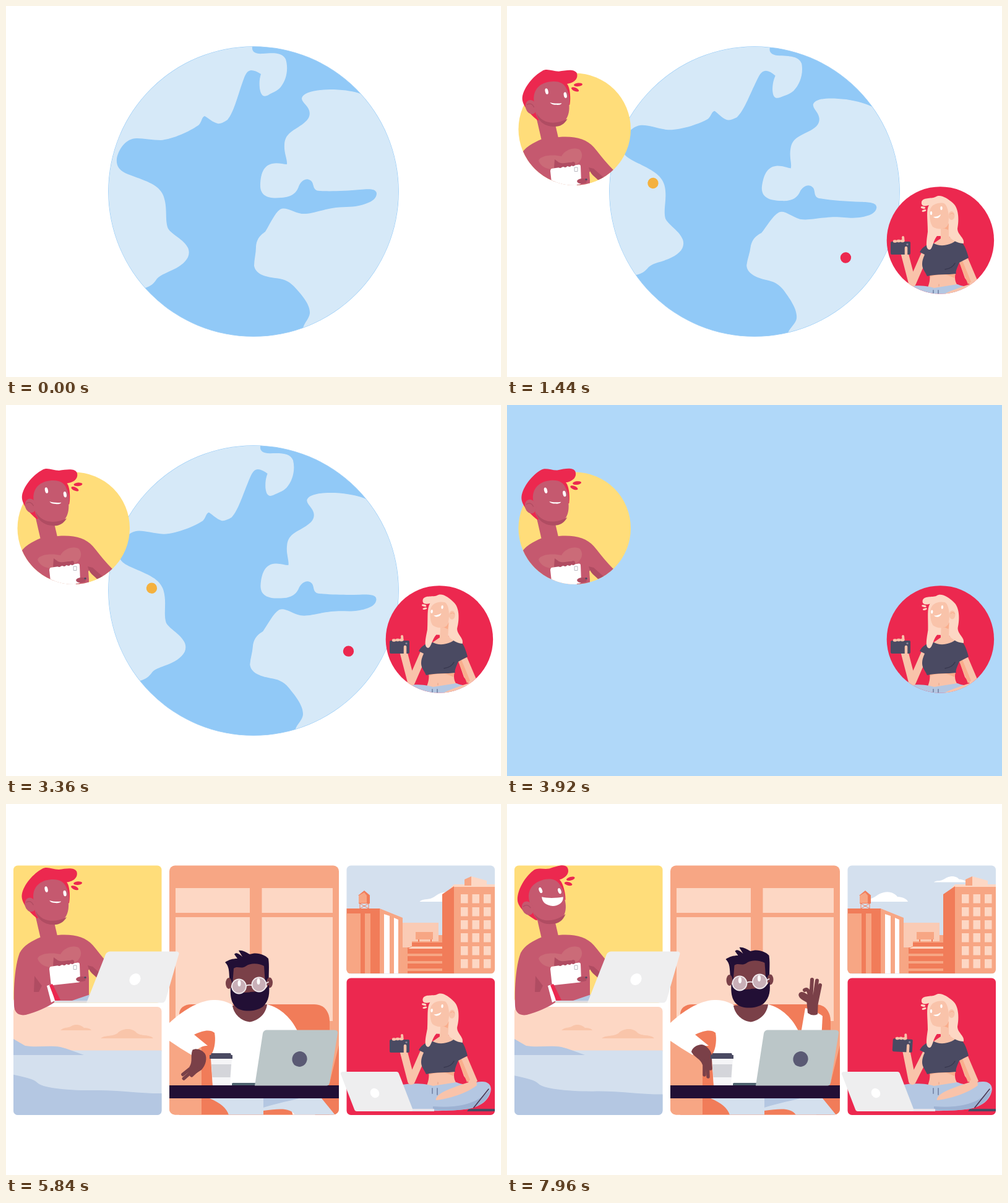
Write an HTML page that moves like this. It is 800 px wide and 600 px high and loops after 8000 ms.

```html
<!DOCTYPE html>
<html lang="en">
<head>
<meta charset="utf-8">
<title>Connected world</title>
<style>
html, body { margin: 0; width: 100%; height: 100%; overflow: hidden; background: #fff; }
svg { display: block; width: 100%; height: 100%; }
.sea { fill: #91c9f7 } .land { fill: #d6e9f8 }
.red { fill: #ec284f } .yellow { fill: #ffdd7a } .white { fill: #fff }
.rose { fill: #c5596f } .roseLight { fill: #cb6b78 } .roseDark { fill: #b04c62 }
.peach { fill: #fdd7c4 } .orange { fill: #f7a684 } .rust { fill: #f17c59 }
.ice { fill: #d4e0ee } .denim { fill: #b4c7e2 }
.ink { fill: #220f35 } .brown { fill: #7a4048 } .slate { fill: #4a4a62 }
.skin { fill: #f9c3aa } .paper { fill: #eeeeef }
.line { fill: none; stroke-linecap: round; stroke-linejoin: round }
</style>
</head>
<body>
<svg viewBox="0 0 800 600" xmlns="http://www.w3.org/2000/svg">
<defs>
  <clipPath id="globeClip"><circle cx="400" cy="300" r="234.3"/></clipPath>
  <clipPath id="manClip"><rect id="manMask"/></clipPath>
  <clipPath id="womanClip"><rect id="womanMask"/></clipPath>
  <clipPath id="cafeClip"><rect x="264" y="99.500" width="274" height="403" rx="9"/></clipPath>
  <clipPath id="cityClip"><rect x="550.500" y="99.500" width="239.500" height="175" rx="7"/></clipPath>
  <clipPath id="beachClip"><rect x="12" y="328" width="239.500" height="175" rx="7"/></clipPath>
  <path id="cloud" d="M0 16C4 11 14 13 20 10C26 8 28 3 38 1C48-2 58 4 60 8C68 8 76 12 77 16Z"/>
  <g id="coin"><circle r="14.500"/><circle class="line" r="11" stroke="#e08a28" stroke-width="1.500" opacity=".55"/></g>
</defs>

<g id="globe">
  <circle class="sea" cx="400" cy="300" r="234.800"/>
  <g clip-path="url(#globeClip)">
    <circle class="land" cx="400" cy="300" r="234.500"/>
    <g id="spin">
      <path class="sea" d="M398 50V66C397 74 403 78 415 77C436 75 447 76 452 86C457 102 453 120 444 131C438 138 430 140 424 144C416 148 412 145 410 133C409 122 410 117 412 110C406 106 401 104 396 104C388 105 386 113 381 127C374 147 368 172 358 184C352 188 346 191 342 190C334 188 328 182 321 178C316 180 317 186 312 192C300 201 272 215 250 217C232 217 215 212 204 215C190 219 181 235 179 247C178 258 182 266 197 272C222 282 246 287 254 306C262 326 256 345 262 360C268 370 287 377 294 391C300 405 289 416 275 424C262 431 250 434 244 441C239 449 234 453 225 456L150 540L300 600L460 570L480 521C482 512 490 506 491 497C492 482 476 465 465 453C456 444 447 441 435 440C418 438 403 433 401 420C401 410 404 400 404 390C405 374 414 369 419 365C426 354 434 335 443 329C452 324 462 333 478 336C492 337 505 331 527 327C545 324 556 326 570 323C588 319 599 313 599 303C598 295 586 296 572 297C550 299 524 300 507 299C494 299 499 286 492 282C484 277 476 284 473 292C470 301 463 309 445 310C425 312 412 308 411 292C411 272 416 258 430 255C440 253 447 256 454 256C455 248 449 238 450 224C451 207 462 203 475 194C487 186 493 179 490 169C487 160 478 156 478 149C481 139 500 135 530 135C550 136 562 138 573 142L640 100L560 40Z"/>
      <circle id="dotA" cx="235.500" cy="305.400" fill="#f4b13f"/>
      <circle id="dotB" class="red" cx="558.700" cy="389.400"/>
    </g>
  </g>
</g>

<g id="panels">
  <g clip-path="url(#beachClip)">
    <rect class="peach" x="12" y="328" width="240" height="72"/>
    <path fill="#f9c5aa" d="M88 366C94 360 100 363 106 359C114 355 122 358 126 362C132 362 136 363 138 366ZM153 379C160 373 170 377 180 371C188 362 204 362 211 370C218 376 232 372 238 379Z"/>
    <rect class="ice" x="12" y="398.500" width="240" height="105"/>
    <path class="denim" d="M12 380L31 391C50 394 68 390 88 393C100 396 112 401 126 406H12Z"/>
    <path id="wave" class="denim" d="M0 425C25 431 45 434 51 441C58 449 100 454 150 453C185 453 220 459 260 458V520H0Z"/>
  </g>

  <g clip-path="url(#cityClip)">
    <rect class="ice" x="550" y="99" width="241" height="176"/>
    <use id="cloudA" class="white" href="#cloud"/>
    <use id="cloudB" class="white" href="#cloud"/>
    <path class="line" d="M572 161V169M586 161V169M572 161L586 169M586 161L572 169" stroke="#f17c59"/>
    <path class="rust" d="M570 148H588V161H570ZM569 148L579 140L588.500 148Z"/>
    <path class="orange" d="M570 148L579 143L583 148V160H570Z"/>
    <path class="rust" d="M550 169H604V274H550Z"/>
    <path class="orange" d="M550 177H573V274H550ZM580 177H589V274H580Z"/>
    <path class="orange" d="M604 169L641 184V274H604Z"/>
    <path class="white" d="M611 178L620 181V274H611ZM627 184L634 187V274H627Z"/>
    <path fill="#facbb5" d="M641 192H699V274H641Z"/>
    <path class="orange" d="M662 207H690V219H662ZM699 212H705V274H699ZM656 222H705V232H656ZM641 232H650V274H641Z"/>
    <path class="rust" d="M666 219H668V223H666ZM686 219H688V223H686ZM656 224H705V232H656ZM649 232H705V274H649Z"/>
    <path class="line" d="M655 232H705M649 244H705M649 256H705M649 268H705" stroke="#f7a684" stroke-width="4"/>
    <path class="peach" d="M656 231H705V234H650ZM724 130H790V136H718ZM752 117L777 124V132H752Z"/>
    <path class="orange" d="M741 122L752 117V132H741ZM724 134H790V274H724Z"/>
    <path class="rust" d="M705 146L724 133V274H705Z"/>
    <g id="windows" class="peach"></g>
  </g>

  <g clip-path="url(#cafeClip)">
    <rect class="orange" x="264" y="99" width="274" height="404"/>
    <path class="peach" d="M274 136H394V176H274ZM413.500 136H528V176H413.500ZM274 183H394V351H274ZM413.500 183H528V351H413.500Z"/>
    <path class="rust" d="M280 503V340C280 330 288 324 300 324H498C513 324 522 334 523 350V503Z"/>
    <path class="orange" d="M264 376H302C312 380 316 390 316 400V503H264Z"/>
    <path class="rust" d="M500 476H538V503H500ZM538 390V455H522Z"/>
    <g id="okHand">
      <path class="white" d="M470 400L482 330C492 332 504 338 510 343L507 400Z"/>
      <path class="brown" d="M486 338L484 316Q492 306 503 316L502 340Q494 344 486 338Z"/>
      <path class="line" stroke="#7a4048" stroke-width="6" d="M491 318L493 284M496 320L501 285.500M500 322L506 293M488 319C474 313 472 308 476 307C480 306 484 312 487 312M489 314C489 302 485 298 481 301"/>
    </g>
    <path class="white" d="M264 354C285 335 310 318 335 317C350 316 362 322 372 328L422 324C445 330 462 348 471 367V455H334L332 405C338 395 339 380 337 370C330 364 318 366 304 373L326 391C318 390 308 396 300 406C288 399 276 391 264 383Z"/>
    <path class="brown" d="M366 326L422 324C420 340 408 350 394 352.500C380 351 368 340 366 326Z"/>
    <g id="tapHand" class="brown">
      <path d="M298 401C299 394 307 389 315 389C323 390 331 400 332 410L331 420L316 422C313 412 303 410 298 401Z"/>
      <path class="line" stroke="#7a4048" stroke-width="5.500" d="M319 416L319 438M324 416L325 441M328 412L329 428"/>
    </g>
    <g id="cafeHead">
      <path class="ink" d="M362 293C360 272 362 264 354 256C360 252 366 250 374 250L369 243C372 239 377 242 382 247L376 237C382 236 388 240 394 243C405 239 418 243 424 250C426 262 424 275 425 293Z"/>
      <ellipse class="brown" cx="360" cy="290" rx="5" ry="9"/><ellipse class="brown" cx="426" cy="289" rx="5" ry="8.500"/>
      <path class="brown" d="M368 266C374 261 380 268 388 262C396 256 410 258 417 262L420 306H365Z"/>
      <path class="ink" d="M363 296C362 312 364 328 380 333C390 336 405 335 415 328C426 318 426 305 425 292L420 298C412 304 405 303 395 304C385 306 372 306 363 296Z"/>
      <path class="brown" d="M386 294H399C399 308 387 308 386 294Z"/>
      <g fill="#c9b0b8" stroke="#f0e9ec" stroke-width="1.800"><circle cx="376.500" cy="295" r="11.500"/><circle cx="409" cy="292" r="11.500"/><path class="line" d="M388 294Q392 292 397.500 293M420 290L424 288"/></g>
      <ellipse class="white" cx="377" cy="290" rx="2.500" ry="5"/><ellipse class="white" cx="408" cy="287" rx="2.500" ry="5"/>
    </g>
    <path fill="#f5f5f7" d="M331 412H365L362 455H334Z"/>
    <path fill="#d4d5da" d="M332 421H364L362.500 442H333.500Z"/>
    <path class="slate" d="M332 403H363L364 406H366V412H329V406H331Z"/>
    <rect x="365" y="451" width="42" height="5" rx="2" fill="#4f6470"/>
  </g>
  <rect class="ink" x="264" y="455" width="274" height="21"/>
  <path fill="#bbc6c8" d="M421 365.500H531Q537 366 536 371L523 451Q522 455.500 518 455.500H402L415 371Q416 366 421 365.500Z"/>
  <ellipse cx="474.500" cy="412.500" rx="12" ry="12.500" fill="#5a5a74" transform="rotate(25 474.500 412.500)"/>
  <g clip-path="url(#cafeClip)">
    <path class="ice" d="M329 476H416V503H360C357 492 346 483 329 476ZM416 476H510L532 503H467C460 492 445 492 416 496Z"/>
    <path class="denim" d="M416 476H474C450 482 430 486 416 491Z"/>
  </g>
</g>

<g id="man">
  <rect id="manBack" class="yellow"/>
  <g id="manCoins" fill="#f4b143"></g>
  <g clip-path="url(#manClip)">
    <path class="rose" d="M57 215C42 221 28 229 22 241C14 262 12 300 13 325C13 337 20 343 32 341C48 337 66 329 78 321H134V262L140 265L158 280L174 267C162 256 150 240 140 228C128 215 110 210 84 212Z"/>
    <path class="yellow" d="M133 268L148 283L139 291L134 282Z"/>
    <path class="roseDark" d="M132 261L140 263L158 279L150 284C142 276 134 272 132 261ZM46 278L58 294L53 304L45 304Z"/>
    <path class="roseLight" d="M51 250C54 241 75 240 88 243C94 232 108 228 117 232C124 238 122 250 112 256C90 266 58 270 51 250Z"/>
    <path class="roseDark" d="M76 262L77 248L84 253C92 257 104 250 110 255L112 261Z"/>
    <path class="white" d="M72 263L116 256.500Q119 256 119 259L120 285Q120 288 117 288.500L76 293Q73 293 72.500 290L70 267Q70 264 72 263Z"/>
    <rect id="cardFill" class="white" x="71" y="284" width="42" height="14"/>
    <path class="line" stroke="#b04c62" stroke-width="6" d="M86 257V259M94 257V258M101 256V257M107 255V256"/>
    <rect class="line" x="109.500" y="261" width="4.500" height="6.500" stroke="#b9b9c0"/>
    <path class="roseDark" d="M113 283C115 279 122 278 130 280L128 286C120 288 114 288 113 283Z"/>
    <circle class="slate" cx="128" cy="280.500" r="1.600"/>
    <g class="manExtra">
      <path class="white" d="M66 294L72 292L79 318L73 321Z"/>
      <path class="red" d="M70 293L75 291L88 317L80 319Z"/>
      <path class="denim" d="M98 321L136 308V321Z"/>
      <path fill="#dcdce2" d="M78 318H134V321.500H78Z"/>
    </g>
  </g>
  <path class="rose" d="M45 170L57 222H85L76 183Z"/>
  <g id="manHead">
    <path class="red" d="M50 185C38 175 24 160 25.500 147C28 130 45 112 58 105C66 100 75 106 85 106C98 104 110 102 114 109C117 118 110 125 98 126.500C103 132 104 150 102 160Z"/>
    <path class="rose" d="M44 152C43 130 60 122 76 122C88 122 94 127 97 134C101 142 103 150 101 160C102 178 95 192 76 195C62 196 50 185 47 174Z"/>
    <path class="roseDark" d="M48 173C58 192 80 192 98 183C92 193 84 196 75 195C62 195 50 186 48 173Z"/>
    <ellipse class="rose" cx="39.500" cy="163" rx="9" ry="11.500" transform="rotate(-15 39.500 163)"/>
    <path class="line" stroke="#b04c62" stroke-width="1.300" d="M33 159Q40 155 44 163"/>
    <ellipse class="red" cx="116" cy="128" rx="7" ry="2.800" transform="rotate(-5 116 128)"/>
    <ellipse class="red" cx="111" cy="135.500" rx="6.500" ry="2.800" transform="rotate(24 111 135.500)"/>
    <ellipse class="white" cx="65" cy="138" rx="2.500" ry="4.800" transform="rotate(-12 65 138)"/>
    <ellipse class="white" cx="95" cy="144.500" rx="2.500" ry="4.800" transform="rotate(-10 95 144.500)"/>
    <path id="smile" class="white"/>
  </g>
  <g class="manExtra">
    <path class="paper" d="M168 238.500H275Q281 239 279 244L258 317Q256 321.500 252 321.500H130L161 243Q163 239 168 238.500Z"/>
    <ellipse class="white" cx="208.500" cy="283.500" rx="8.500" ry="10" transform="rotate(40 208.500 283.500)"/>
  </g>
</g>

<g id="woman">
  <rect id="womanBack" class="red"/>
  <g id="womanCoins"></g>
  <g clip-path="url(#womanClip)">
    <path class="skin" d="M731 414L745 408L762 448L752 456L740 440Z"/>
    <path fill="#f9ad8c" d="M731 414L736 412L750 446L745 450Z"/>
    <path class="skin" d="M683 432L725 430C722 444 726 450 732 456L676 462C684 450 684 440 683 432Z"/>
    <path fill="#f9ad8c" d="M683 432H725L723 440C710 432 695 434 684 438Z"/>
    <path class="denim" d="M632 456C650 450 680 452 690 456L728 450C745 458 757 448 770 449C780 449 786 456 783 466C778 484 760 492 740 494C715 497 690 496 650 496Z"/>
    <path fill="#9db2d3" d="M690 489C730 492 760 486 783 462C778 484 760 492 740 494C722 496 705 496 690 494Z"/>
    <path class="skin" d="M760 446C742 452 722 458 706 466C698 471 694 475 695 479C708 478 742 470 761 455Z"/>
    <path class="line" stroke="#7f8fb0" stroke-width="2" d="M689 460V468M697 460V470"/>
    <path class="line" stroke="#e4a184" stroke-width="1" d="M698 450V453"/>
    <g id="phoneArm">
      <path class="line" stroke="#f9c3aa" stroke-width="12" d="M675 402L655 448L642 398"/>
      <path class="line" stroke="#f9c3aa" stroke-width="4" d="M628 382L633 380M640 374L641 384"/>
      <rect class="slate" x="620" y="381" width="32" height="21" rx="2"/>
      <circle cx="647" cy="385.500" r="1.600" fill="#85859a"/>
      <path class="line" stroke="#f9c3aa" stroke-width="4.500" d="M626 380.500H628M632 380H634M638 380H640M645 391L645 402"/>
    </g>
    <path class="skin" d="M700 350H715V374L730 378C720 392 698 390 688 385L701 376Z"/>
    <path class="slate" d="M690 384C698 389 716 389 728 377C738 382 742 392 746 407L731 415C729 420 724 430 726 433C712 435 695 433 679 437C676 430 671 425 671 418C671 410 674 405 675 402L667 398C672 388 682 384 690 384Z"/>
    <path class="line" stroke="#38384f" stroke-width="1.500" d="M708 426Q720 424 724 416"/>
    <g id="womanHead">
      <path class="peach" d="M670 317C672 309 685 312 692 309C700 303 712 311 720 318C730 326 731 345 728 360C728 370 740 375 738 384C728 384 718 378 714 372H695C688 380 688 395 682 394C676 392 678 380 680 365C680 345 677 330 682 322C674 325 669 323 670 317Z"/>
      <path class="skin" d="M701 352H714V376H701Z"/>
      <path fill="#f9ad8c" d="M700 357C706 364 713 356 714 350L713 362Z"/>
      <path class="skin" d="M683 334C683 322 695 317 706 319C714 323 715 345 713 352C708 363 695 362 688 357C683 350 683 340 683 334Z"/>
      <ellipse class="skin" cx="718.500" cy="339" rx="5" ry="7"/>
      <path class="line" stroke="#f9ad8c" d="M716 337Q719 333 722 337"/>
      <ellipse class="white" cx="685.500" cy="335" rx="1.700" ry="3"/><ellipse class="white" cx="702" cy="327" rx="1.700" ry="3"/>
      <path class="white" d="M689 341C693 341 697 340 701 337C700 343 693 345 689 341Z"/>
      <ellipse class="peach" cx="672.500" cy="326" rx="3.800" ry="1.700" transform="rotate(12 672.500 326)"/>
      <ellipse class="peach" cx="674" cy="331" rx="3.500" ry="1.600" transform="rotate(-15 674 331)"/>
    </g>
    <path fill="#e6e6ec" d="M640 493H692V497H640Z"/>
    <path class="paper" d="M545 433H631Q634 433 635 436L657 493Q658 497 655 497H567Q564 497 563 494L541 437Q540 433 545 433Z"/>
    <ellipse class="white" cx="596" cy="467.500" rx="7" ry="8" transform="rotate(-35 596 467.500)"/>
    <path class="line" stroke="#4a3550" stroke-width="1.600" d="M756 491L780 461"/>
    <path class="slate" d="M748 493H790V497H745Z"/>
  </g>
</g>
</svg>

<script>
const LOOP = 8000;
const $ = id => document.getElementById(id);
const set = (id, attrs) => { for (const k in attrs) $(id).setAttribute(k, attrs[k]); };
const move = (id, transform) => set(id, { transform });
const mix = (a, b, p) => a + (b - a) * p;
const ramp = (t, a, b) => Math.min(1, Math.max(0, (t - a) / (b - a)));
const ease = u => u * u * (3 - 2 * u);

// Eased value through [time, value] pairs.
function track(t, ...keys) {
  if (t <= keys[0][0]) return keys[0][1];
  for (let i = 1; i < keys.length; i++) {
    const [a, from] = keys[i - 1], [b, to] = keys[i];
    if (t <= b) return mix(from, to, ease(ramp(t, a, b)));
  }
  return keys[keys.length - 1][1];
}

function morphBox(id, from, to, p) {
  const [x, y, width, height, rx] = from.map((v, i) => mix(v, to[i], p));
  set(id, { x, y, width, height, rx });
}

const smallSmile = [70, 156, 76, 158, 83, 158, 89, 157.5, 88, 160, 83, 160.5, 80, 160, 76, 160, 72, 159, 70, 156];
const bigSmile = [65, 149, 74, 153, 88, 155, 99, 155, 98, 165, 88, 168, 80, 166.5, 70, 164, 64, 158, 65, 149];
const manCircle = [18.5, 108.5, 181.5, 181.5, 90.75];
const womanCircle = [613.7, 292.2, 173.4, 173.4, 86.7];
const coinStarts = [6075, 6517, 6960];

let panes = '';
for (let i = 0; i < 18; i++)
  panes += `<rect x="${735 + (i % 3) * 18.5}" y="${146 + Math.floor(i / 3) * 21}" width="11.5" height="14.5"/>`;
$('windows').innerHTML = panes;

const womanCoinFills = ['#f0672b', '#f5a93b', '#f0672b'];
coinStarts.forEach((_, i) => {
  $('manCoins').innerHTML += `<use id="manCoin${i}" href="#coin"/>`;
  $('womanCoins').innerHTML += `<use id="womanCoin${i}" href="#coin" fill="${womanCoinFills[i]}"/>`;
});

function drawGlobe(t) {
  const zoom = 1 + 8.5 * ramp(t, 3400, 3840) ** 2;
  const fade = 1 - ramp(t, 3840, 4120);
  move('globe', `translate(335 310) scale(${zoom}) translate(-335 -310)`);
  set('globe', { opacity: fade, display: fade ? 'inline' : 'none' });
  move('spin', `rotate(${4.3 * (1 - Math.cos(2 * Math.PI * t / 4250))} 400 300)`);
  const r = 8.7 * ease(ramp(t, 200, 500));
  set('dotA', { r });
  set('dotB', { r });
}

function flyOut(id, p, dot, centre) {
  const x = mix(dot[0], centre[0], p), y = mix(dot[1], centre[1], p);
  set(id, {
    display: p ? 'inline' : 'none',
    transform: `translate(${x} ${y}) scale(${p}) translate(${-centre[0]} ${-centre[1]})`
  });
}

function drawCoins(t) {
  coinStarts.forEach((start, i) => {
    const u = (t - start) / 900;
    const live = u > 0 && u < 1;
    const size = 1 - ramp(u, 0.85, 1);
    const flip = Math.max(0.08, Math.abs(Math.cos(Math.PI * (t - 6720) / 442)));
    const place = (id, x, y) => set(id, {
      display: live ? 'inline' : 'none',
      transform: `translate(${x} ${y}) scale(${size * flip} ${size})`
    });
    place('manCoin' + i, 207.5, 270 - 120 * u);
    place('womanCoin' + i, 592, 460 - 102 * u);
  });
}

function drawPeople(t, open) {
  const arrive = ease(ramp(t, 550, 1150));
  flyOut('man', arrive, [235, 300], [109, 199]);
  flyOut('woman', arrive, [556, 394], [700.5, 379]);

  morphBox('manBack', manCircle, [12, 99.5, 239.5, 222, 7], open);
  morphBox('manMask', manCircle, [12, 99.5, 290, 250, 7], open);
  morphBox('womanBack', womanCircle, [550.5, 281.5, 239.5, 221.5, 7], open);
  morphBox('womanMask', womanCircle, [535, 281.5, 255, 221.5, 7], open);
  document.querySelectorAll('.manExtra').forEach(el => el.setAttribute('opacity', open));
  set('cardFill', { opacity: 1 - open });

  const nod = track(t, [1000, -2.5], [1440, -0.8], [1760, 0], [3360, 0.4], [3920, -2.3],
    [4240, -2.4], [4900, 0], [6760, 0.2], [7560, -7.8], [7960, -10]);
  move('manHead', `rotate(${nod} 68 200)`);
  const grin = ease(ramp(t, 6900, 7650));
  const s = smallSmile.map((v, i) => mix(v, bigSmile[i], grin).toFixed(2));
  set('smile', { d: `M${s.slice(0, 2)}C${s.slice(2)}Z` });

  const tilt = track(t, [1680, 0], [2520, 3.3], [3400, 3.3], [4400, 0], [5080, 0],
    [5880, 3.3], [6760, 3.3], [7560, 0]);
  move('womanHead', `rotate(${tilt} 705 380)`);
  move('phoneArm', `rotate(${track(t, [7000, 0], [7900, 3.3])} 655 448)`);
}

function drawPanels(t, open) {
  set('panels', { opacity: open, display: open ? 'inline' : 'none' });
  move('wave', `translate(0 ${track(t, [4900, 0], [5900, 10], [6700, 12.5], [7960, 11.5])})`);
  move('cloudA', `translate(${628 - (t - 6720) * 0.046} 142)`);
  move('cloudB', `translate(${768 - (t - 6720) * 0.063} 117) scale(.68 .6)`);
  const tap = track(t, [4950, 0], [5350, 50], [5600, 45], [5850, 51], [6100, 45], [6350, 51],
    [6800, 50], [7300, 0]);
  move('tapHand', `rotate(${tap} 303 403)`);
  const lift = track(t, [6900, 0], [7450, 1]);
  move('okHand', `translate(0 ${125 * (1 - lift)}) rotate(${-25 * (1 - lift)} 490 400)`);
  const bob = track(t, [4240, 0], [6800, 0], [7500, 1], [7960, 1]);
  move('cafeHead', `translate(${-0.5 * bob} ${-5 * bob})`);
}

function frame(now) {
  const t = now % LOOP;
  const open = ease(ramp(t, 3940, 4180));
  drawGlobe(t);
  drawPanels(t, open);
  drawPeople(t, open);
  drawCoins(t);
  requestAnimationFrame(frame);
}
const begin = performance.now();
const tick = () => { };
requestAnimationFrame(function first() { frame(performance.now() - begin < 40 ? 0 : performance.now()); });
</script>
</body>
</html>
```
